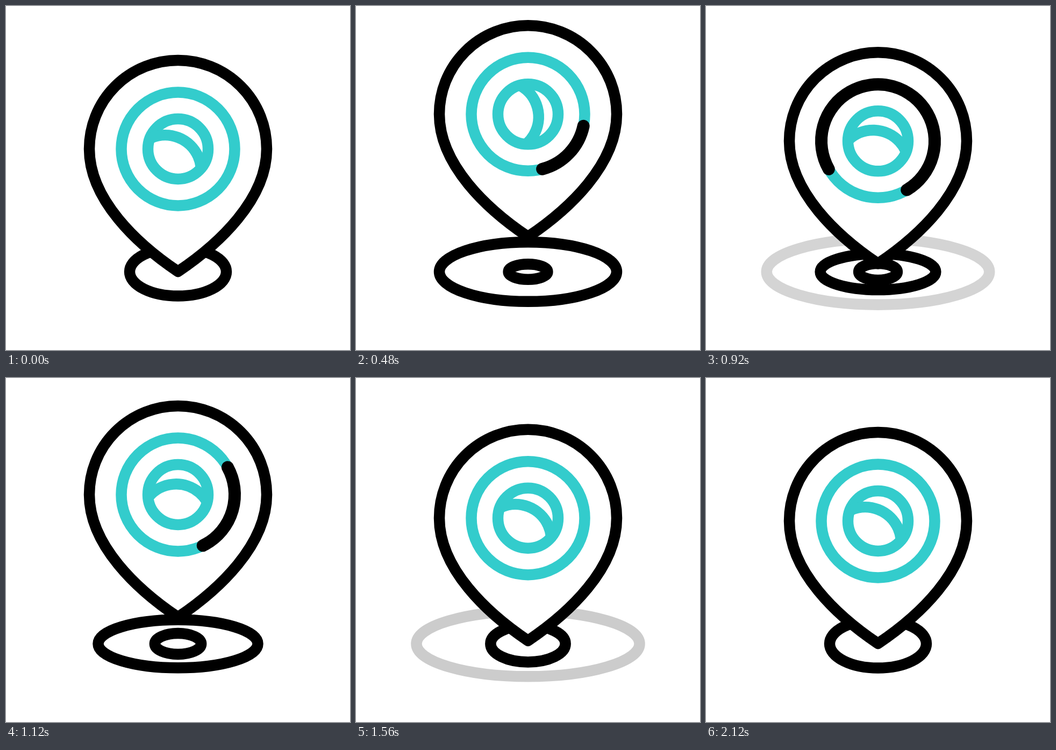
Recreate the animation shown at these times as an HTML page with a canvas. Size 640 by 640 pixels, loop 3000 ms.

```html
<!DOCTYPE html>
<html lang="en">
<head>
<meta charset="utf-8">
<title>Location pin</title>
<style>
html, body { margin: 0; width: 100%; height: 100%; overflow: hidden; background: #fff; }
canvas { display: block; width: 100vw; height: 100vh; object-fit: contain; }
</style>
</head>
<body>
<canvas id="stage" width="640" height="640"></canvas>
<script>
const ctx = document.getElementById('stage').getContext('2d');
const LOOP = 3000, STEP = 40;
const BLACK = '#000', TEAL = '#33cccc';
const LINE = 20.5, CX = 320, HEAD_Y = 266, GROUND_Y = 494.5;
const RAD = Math.PI / 180;

// [time, value] keys, eased in and out between neighbours
const LIFT = [[0, 0], [480, -64.7], [803, 0], [1120, -49], [1452, 0], [1860, -32.5], [2120, 0]];
const TILT = [[0, 30], [470, 84], [1055, 0.5], [1410, 47.5], [1735, 7], [2120, 30]];
const SWEEP_HEAD = [[313, 12], [964, 424]];
const SWEEP_TAIL = [[650, 12], [1336, 424]];

const clamp = x => Math.min(1, Math.max(0, x));
const mix = (a, b, k) => a + (b - a) * k;
const ease = u => (1 - Math.cos(Math.PI * clamp(u))) / 2;

function track(keys, t) {
  if (t <= keys[0][0]) return keys[0][1];
  for (let i = 1; i < keys.length; i++) {
    const [t0, a] = keys[i - 1], [t1, b] = keys[i];
    if (t < t1) return mix(a, b, ease((t - t0) / (t1 - t0)));
  }
  return keys[keys.length - 1][1];
}

function stroke(color, width = LINE) {
  ctx.strokeStyle = color;
  ctx.lineWidth = width;
  ctx.stroke();
}

function circle(r, color) {
  ctx.beginPath();
  ctx.arc(0, 0, r, 0, 2 * Math.PI);
  stroke(color);
}

function ripple(from, to, k, alpha) {
  if (alpha <= 0) return;
  ctx.globalAlpha = alpha;
  ctx.beginPath();
  ctx.ellipse(CX, GROUND_Y, mix(from[0], to[0], k), mix(from[1], to[1], k), 0, 0, 2 * Math.PI);
  stroke(BLACK);
  ctx.globalAlpha = 1;
}

function ripples(t) {
  const rest = [90, 45], wide = [210, 61.5];
  if (t < 1000) {
    ripple(rest, wide, 1 - Math.pow(1 - t / 1000, 1.5), clamp((1000 - t) / 480));
  }
  if (t > 291 && t < 1660) {
    const alpha = Math.min(clamp((t - 291) / 140), clamp((1660 - t) / 500));
    ripple([28, 12], wide, ease((t - 291) / 1370), alpha);
  }
  if (t > 760) {
    ripple([34, 14.5], rest, ease((t - 760) / 1360), clamp((t - 760) / 140));
  }
}

function pinBody() {
  ctx.beginPath();
  ctx.moveTo(0, 228);
  ctx.bezierCurveTo(-76, 177, -165, 94, -165, 0);
  ctx.arc(0, 0, 165, Math.PI, 2 * Math.PI);
  ctx.bezierCurveTo(165, 94, 76, 177, 0, 228);
  ctx.closePath();
  ctx.fillStyle = '#fff';
  ctx.fill();
  stroke(BLACK);
}

function globe(angle) {
  circle(56, TEAL);
  ctx.save();
  ctx.rotate(angle * RAD);
  ctx.lineCap = 'butt';
  ctx.beginPath();
  ctx.arc(0, 47.5, 67, -144 * RAD, -36 * RAD);
  stroke(TEAL);
  ctx.restore();
}

function sweep(t) {
  const head = track(SWEEP_HEAD, t), tail = track(SWEEP_TAIL, t);
  if (head - tail < 0.1) return;
  ctx.beginPath();
  ctx.arc(0, 0, 105.5, tail * RAD, Math.min(head, tail + 360) * RAD);
  stroke(BLACK, 23);
}

function draw(t) {
  ctx.fillStyle = '#fff';
  ctx.fillRect(0, 0, 640, 640);
  ctx.lineCap = ctx.lineJoin = 'round';
  ripples(t);
  ctx.save();
  ctx.translate(CX, HEAD_Y + track(LIFT, t));
  pinBody();
  circle(105.5, TEAL);
  globe(track(TILT, t));
  sweep(t);
  ctx.restore();
}

const start = performance.now();
function tick() {
  const t = (performance.now() - start) % LOOP;
  draw(Math.floor(t / STEP) * STEP);
  requestAnimationFrame(tick);
}
tick();
</script>
</body>
</html>
```
